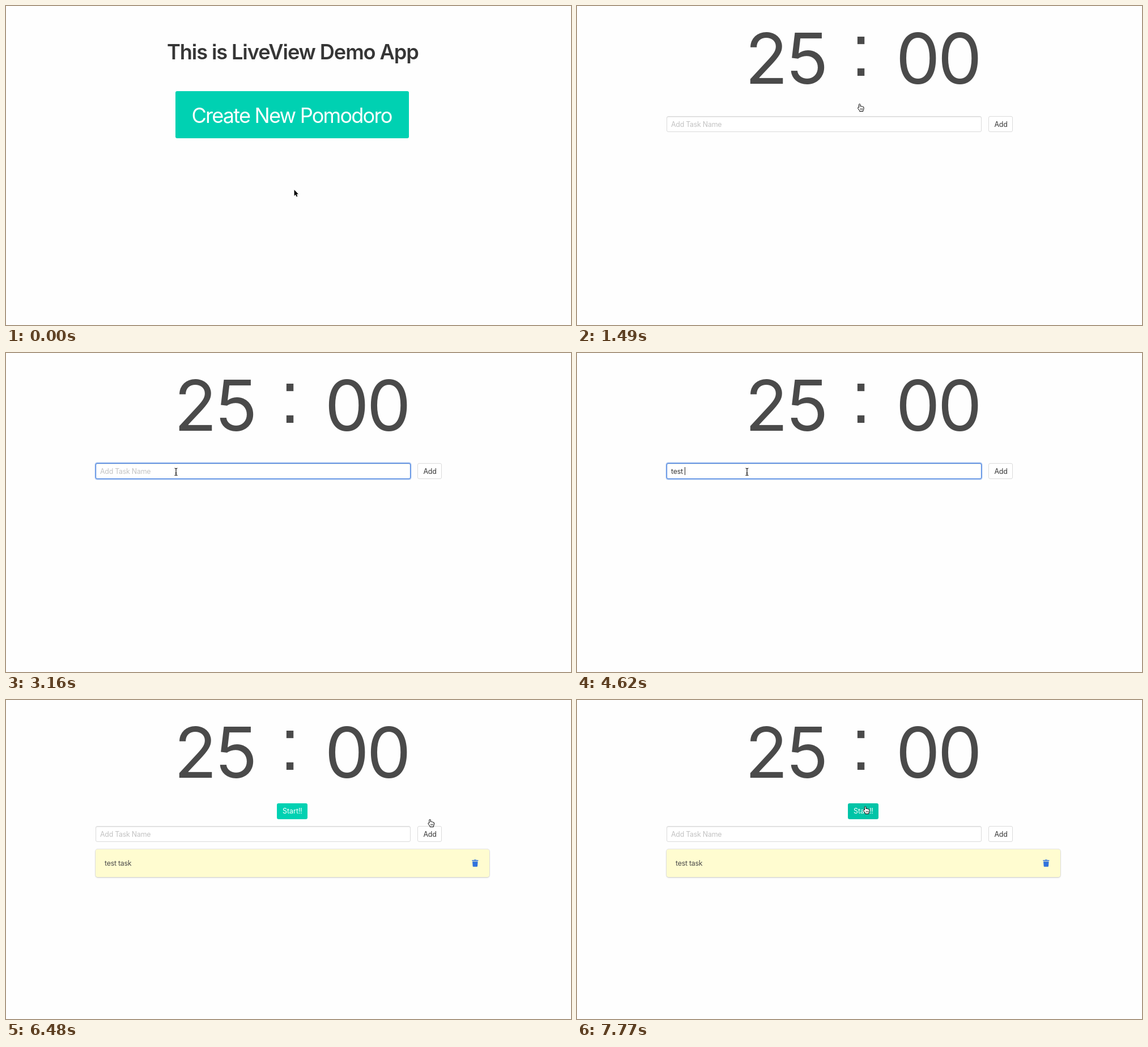
An HTML page that plays this animation: 997 by 562 pixels, repeating every 8000 ms.

```html
<!DOCTYPE html>
<html lang="en">
<head>
<meta charset="utf-8">
<title>Pomodoro demo</title>
<style>
html, body { margin: 0; width: 100%; height: 100%; overflow: hidden; background: #fefefe; }
body { position: relative; font: 12.4px Inter, "Open Sans", sans-serif; letter-spacing: -.02em; font-feature-settings: "ss07"; color: #363636; }
div, svg { position: absolute; box-sizing: border-box; }
.text { line-height: 0; white-space: pre; }
.page { inset: 0; }
.big { font-size: 36.2px; letter-spacing: -.051em; }
#title { left: 284px; top: 80.5px; font-weight: 600; letter-spacing: -.031em; }
#create { left: 299px; top: 150px; width: 412px; height: 83px; border-radius: 3px; }
#create .text { left: 28.5px; top: 43px; }
.primary { background: #00d1b2; color: #fff; }
.primary.hover { background: #00c4a7; }
#create.focus { box-shadow: 0 0 0 4.5px rgba(0, 209, 178, .2); }
.clock { font-size: 124px; letter-spacing: 0; top: 92px; color: #4a4a4a; }
.clock.colon { font: 130px/0 "Liberation Sans", Arial, sans-serif; left: 483px; top: 77.5px; }
#form { left: 0; top: 194px; }
#field, #add { height: 28px; border: 1px solid #dbdbdb; border-radius: 3px; background: #fff; }
#field { left: 158px; width: 556px; padding-left: 7px; display: flex; align-items: center; box-shadow: inset 0 1px 1px rgba(10, 10, 10, .1); }
#field.hover, #add.hover { border-color: #b5b5b5; }
#field.focus { border-color: #3273dc; box-shadow: inset 0 1px 1px rgba(10, 10, 10, .1), 0 0 0 1.5px rgba(50, 115, 220, .4); }
#add.focus { border-color: #3273dc; box-shadow: 0 0 0 1.5px rgba(50, 115, 220, .25); }
#typed { white-space: pre; }
#caret { width: 1px; height: 14px; background: #222; }
#hint { left: 7px; top: 13.5px; color: #c3c3c3; }
#add { left: 726px; width: 43px; }
#add .text { left: 9.5px; top: 13.5px; }
#start { left: 478px; top: 182px; width: 54px; height: 28px; border-radius: 3px; }
#start .text { left: 10px; top: 14px; letter-spacing: 0; }
#task { left: 158px; top: 263px; width: 695px; height: 49px; border-radius: 4px; background: #fffcd0; color: #4a4a4a; box-shadow: 0 1.5px 2.5px rgba(10, 10, 10, .1), 0 0 0 1px rgba(10, 10, 10, .1); }
#task .text { left: 16px; top: 24.5px; }
#task svg { left: 664px; top: 18px; fill: #3273dc; }
#pointer { left: 0; top: 0; overflow: visible; }
</style>
</head>
<body>
<div class="page" id="home">
  <div class="text big" id="title">This is LiveView Demo App</div>
  <div class="primary" id="create"><div class="text big">Create New Pomodoro</div></div>
</div>
<div class="page" id="timer">
  <div class="text clock" style="left:296.5px">2</div>
  <div class="text clock" style="left:370px">5</div>
  <div class="text clock colon">:</div>
  <div class="text clock" style="left:562.5px">0</div>
  <div class="text clock" style="left:636.5px">0</div>
  <div id="form">
    <div id="field"><span id="typed"></span><i id="caret"></i><div class="text" id="hint">Add Task Name</div></div>
    <div id="add"><div class="text">Add</div></div>
  </div>
  <div id="tasks">
    <div class="primary" id="start"><div class="text">Start!!</div></div>
    <div id="task">
      <div class="text">test task</div>
      <svg width="12" height="13"><path d="M.3 1H3.6L4.2.2H7.4L8 1H11.3V2.6H.3ZM1 3.4H10.6L10 11.8Q9.9 12.8 8.9 12.8H2.7Q1.7 12.8 1.6 11.8Z"/></svg>
    </div>
  </div>
</div>
<svg id="pointer" width="1" height="1">
  <path id="arrow" d="M.6.8V11.4L3 9.2 4.7 13 6.4 12.3 4.8 8.6H8Z" stroke="#fff" stroke-width="1.2" paint-order="stroke"/>
  <g id="hand" fill="#fff" stroke="#000" stroke-linejoin="round">
    <path d="M-1.6 7V1.6Q-1.5.5-.4.5T.9 1.6V4.6Q2.1 3.8 3.1 4.9 4.4 4.3 5.2 5.5 7 5.2 7 7V9.4Q6.8 11 5.8 12V13.6H-.4V12.4L-3.2 8.5Q-4 7-3 6.6-2.3 6.3-1.6 7Z"/>
    <path d="M1.2 8.2V11.2M3 8.2V11.2M4.8 8.2V11.2" stroke-width=".7"/>
  </g>
  <path id="beam" d="M-2.5-6Q0-6 0-4.5 0-6 2.5-6M0-4.5V5M-2.5 6.5Q0 6.5 0 5 0 6.5 2.5 6.5M-1.3 2.5H1.3" fill="none" stroke="#000" stroke-width="1.1"/>
</svg>
<script>
const LOOP = 8000;
const $ = id => document.getElementById(id);
const show = (id, on) => $(id).style.display = on ? '' : 'none';
const mark = (id, name, on) => $(id).classList.toggle(name, on);

// start, end, steps, then the points of a quadratic curve
const moves = [
  [0, 0, 1, [508, 323], [508, 323], [508, 323]],
  [360, 920, 7, [508, 323], [520, 49], [499, 173]],
  [1190, 1190, 1, [499, 173], [499, 172], [499, 172]],
  [1940, 2300, 5, [499, 172], [400, 200], [300, 209]],
  [5160, 5610, 6, [300, 209], [865, 415], [748.5, 210]],
  [6600, 6600, 1, [748.5, 210], [744, 206], [744, 206]],
  [7260, 7770, 6, [744, 206], [550, 110], [509, 187]]
];
const keys = [[4090, 't'], [4180, 'e'], [4270, 's'], [4450, 't'], [4620, ' '], [4710, 't'], [4800, 'as'], [4890, 'k']];

function pointerAt(t) {
  const [from, to, steps, a, b, c] = moves.findLast(m => t >= m[0]);
  const n = to > from ? Math.floor((t - from) / (to - from) * (steps - 1) + 1e-6) + 1 : steps;
  const p = Math.min(1, n / steps), q = 1 - p;
  return [0, 1].map(i => q * q * a[i] + 2 * p * q * b[i] + p * p * c[i]);
}

function draw(t) {
  const [x, y] = pointerAt(t);
  const over = (l, top, r, bottom) => x >= l && x <= r && y >= top && y <= bottom;
  const between = (a, b) => t >= a && t < b;
  const home = t < 1490, added = t >= 6480;
  const onCreate = t < 1940 && over(299, 150, 711, 233);
  const onField = between(1940, 6480) && over(158, 194, 714, 222);
  const onAdd = between(1940, 6600) && over(726, 194, 769, 222);
  const onStart = added && over(478, 182, 532, 210);
  const focus = between(2570, 6360);

  show('home', home);
  show('timer', !home);
  show('tasks', added);
  mark('create', 'hover', onCreate);
  mark('create', 'focus', t >= 1370);
  mark('field', 'hover', onField);
  mark('field', 'focus', focus);
  mark('add', 'hover', !added && onAdd && t >= 5700);
  mark('add', 'focus', between(6360, 6480));
  mark('start', 'hover', onStart);
  $('form').style.top = (added ? 222 : 194) + 'px';

  const typed = added ? '' : keys.filter(k => t >= k[0]).map(k => k[1]).join('');
  $('typed').textContent = typed;
  show('hint', !typed);
  show('caret', focus && t >= 2650 && !between(3160, 3700) && !between(5430, 5880));

  const hand = onCreate || onAdd || onStart;
  show('hand', hand);
  show('beam', onField);
  show('arrow', !hand && !onField);
  $('pointer').style.transform = `translate(${x}px, ${y}px)`;
}

function tick(now) {
  draw(now % LOOP);
  requestAnimationFrame(tick);
}
draw(0);
requestAnimationFrame(tick);
</script>
</body>
</html>
```
